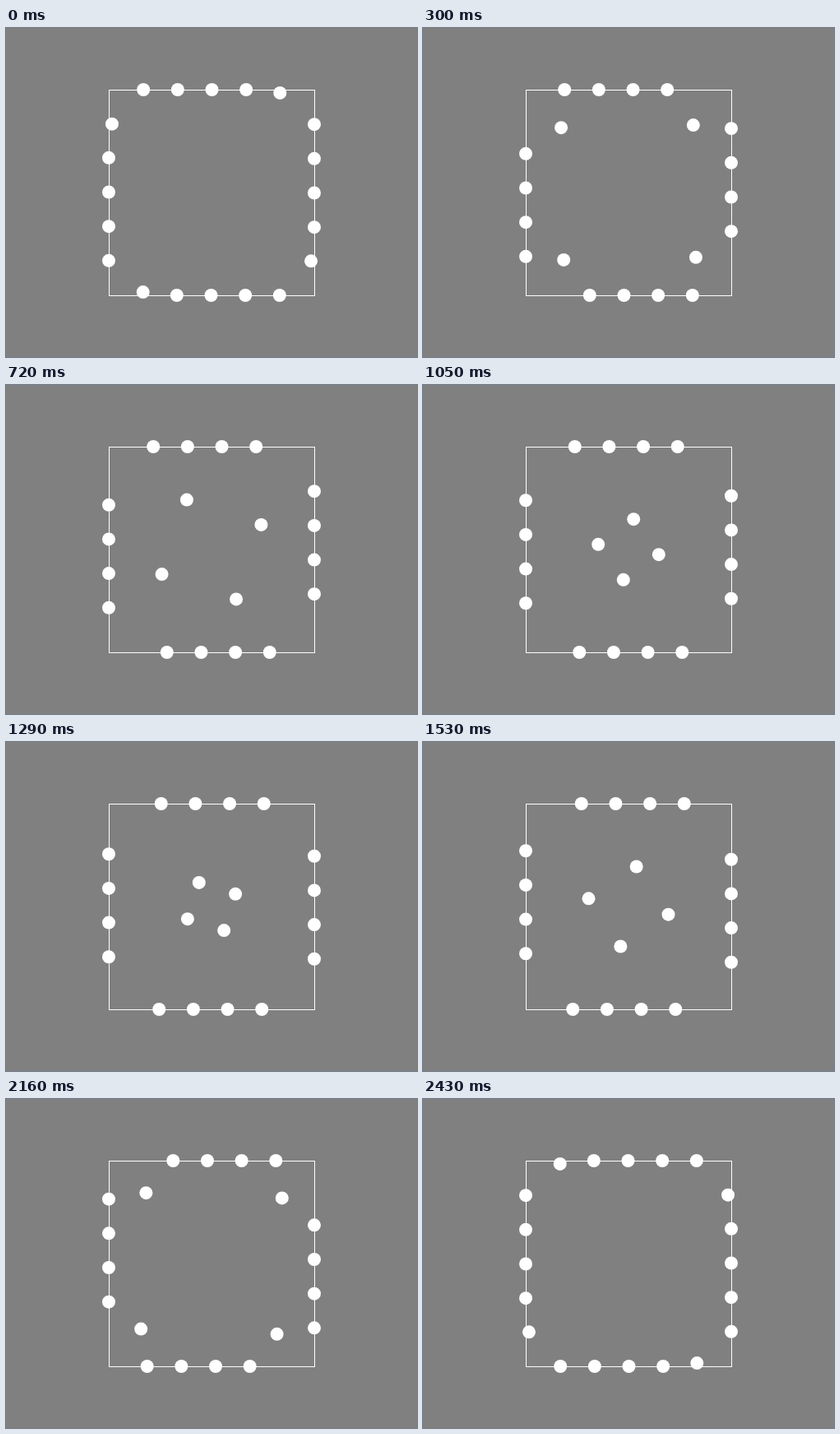
Recreate the animation shown at these times as an HTML page with a canvas. Size 500 by 400 pixels, loop 2.46 s.

```html
<!DOCTYPE html>
<html lang="en">
<head>
<meta charset="utf-8">
<title>Dots around a square</title>
<style>
html, body { margin: 0; width: 100%; height: 100%; overflow: hidden; background: #808080; }
canvas { display: block; }
</style>
</head>
<body>
<canvas id="stage" width="500" height="400"></canvas>
<script>
const ctx = document.getElementById('stage').getContext('2d');
const STEP_MS = 30, STEPS = 82;
const HALF = 125, GAP = HALF / 3, RADIUS = 5 * GAP, DOT = 8;

function dot(x, y) {
  ctx.beginPath();
  ctx.arc(x, y, DOT, 0, Math.PI * 2);
  ctx.fill();
}

// One side: four dots slide along the edge, a fifth swings over to the next side.
function drawSide(p) {
  for (let k = 0; k < 4; k++) dot((k + p - 2) * GAP, -HALF);
  const angle = p * Math.PI / 2;
  dot(RADIUS * Math.cos(angle) - HALF, RADIUS * Math.sin(angle) - HALF);
}

function draw(ms) {
  const step = Math.floor(ms / STEP_MS) % STEPS;
  const p = (step + 1) / (STEPS + 1);

  ctx.fillStyle = '#808080';
  ctx.fillRect(0, 0, 500, 400);
  ctx.fillStyle = ctx.strokeStyle = '#fff';
  ctx.lineWidth = 1;
  ctx.strokeRect(125.5, 75.5, 2 * HALF, 2 * HALF);

  ctx.save();
  ctx.translate(250, 200);
  for (let side = 0; side < 4; side++) {
    drawSide(p);
    ctx.rotate(Math.PI / 2);
  }
  ctx.restore();
}

const start = performance.now();
function tick() {
  draw(performance.now() - start);
  requestAnimationFrame(tick);
}
tick();
</script>
</body>
</html>
```
